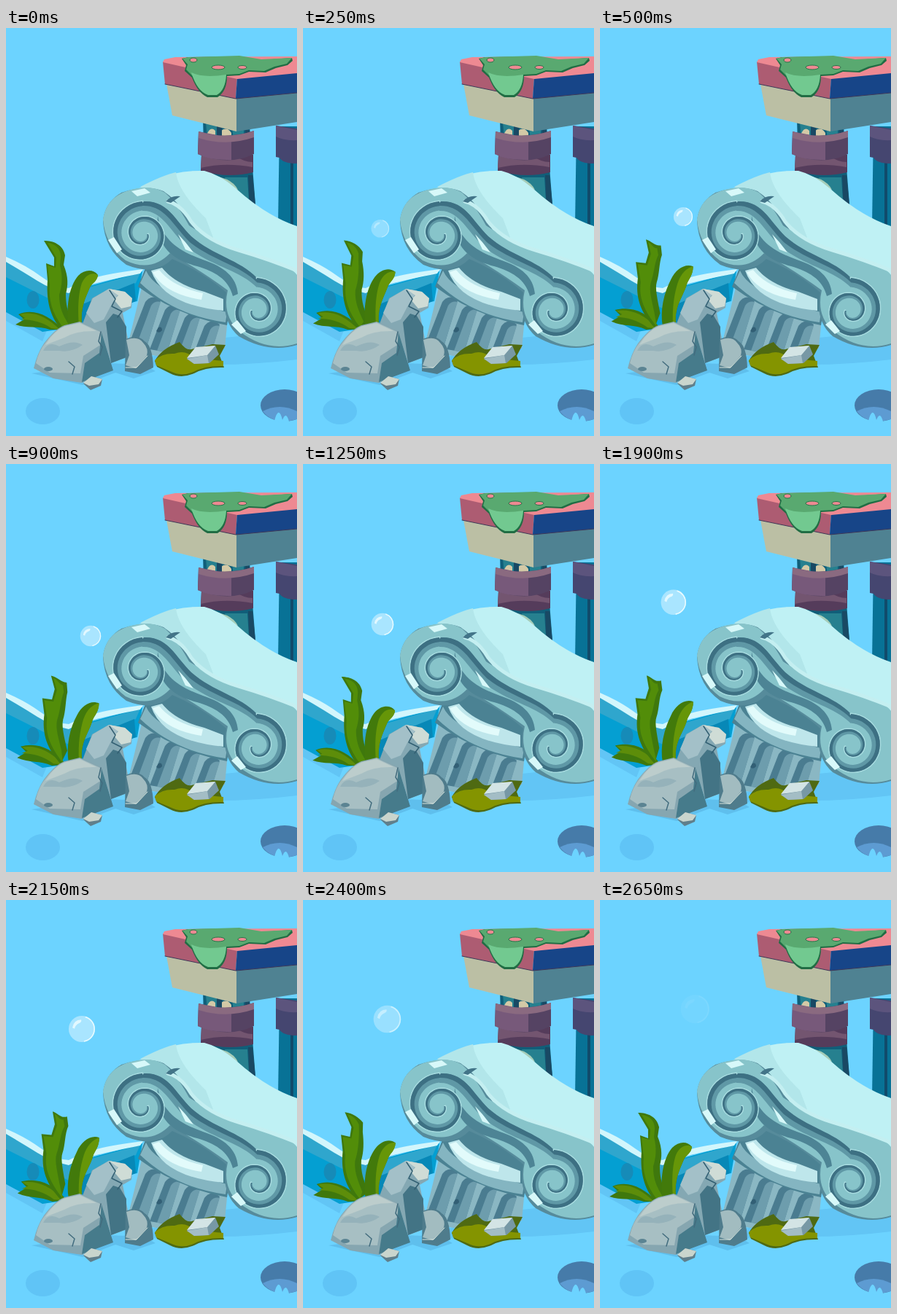
Write an HTML page that moves like this. It is 399 px wide and 560 px high and loops after 2.7 s.

```html
<!DOCTYPE html>
<html lang="en">
<head>
<meta charset="utf-8">
<title>Sunken ruins</title>
<style>
html, body { margin: 0; width: 100%; height: 100%; overflow: hidden; background: #6cd3ff; }
svg { display: block; width: 100vw; height: 100vh; }
.line { fill: none; stroke-linecap: round; stroke-linejoin: round; }
</style>
</head>
<body>
<svg viewBox="0 0 399 560">
  <!-- sea wall and floor -->
  <path fill="#62c5f5" d="M0 382L60 405 50 430 0 402ZM145 465L300 425 399 415V455Q310 466 230 460L145 474Z"/>
  <path fill="#049fd2" d="M0 318L86 362 187 334 180 375 120 385 100 410 50 417 0 390Z"/>
  <path fill="#2fa6cd" d="M0 319L86 364 184 336 178 350 115 376 88 386 0 342Z"/>
  <path fill="#0788b7" d="M88 386L176 350 178 375 105 405Z"/>
  <path fill="#d2f6fc" d="M0 314Q28 326 48 341T86 357Q108 346 128 341T188 331L184 337Q145 345 124 350T86 364Q62 359 43 347T0 321Z"/>
  <ellipse cx="37" cy="373" rx="8.500" ry="12" fill="#168bb8"/>
  <ellipse cx="50.500" cy="526" rx="23.500" ry="18" fill="#60c4f6"/>
  <ellipse cx="382" cy="518" rx="33" ry="22" fill="#467ba9"/>
  <path fill="#5d9bd2" d="M352 526Q375 514 399 526V537Q367 546 352 526Z"/>
  <path fill="#6cd3ff" d="M368 539Q374 517 379 538 384 525 388 540Q378 544 368 539Z"/>

  <!-- distant columns -->
  <path fill="#105e79" d="M270 124H334L335 160H271ZM270 191H338L343 255H268Z"/>
  <path fill="#26808f" d="M274 130L290 134V152H276ZM310 136L326 139V153H312ZM300 205H331L334 253H310Z"/>
  <path fill="#d3c9a6" d="M275 147Q280 134 287 141V152H276ZM295 151V141Q303 135 309 144V153Z"/>
  <path fill="#194964" d="M289 132L296 134V153H289ZM328 140H334V153H328ZM332 202H338L343 253H334Z"/>
  <path fill="#553c5b" d="M268 174H339V198Q305 207 267 196Z"/>
  <path fill="#735570" d="M268 174H310Q327 184 338 184V191Q300 184 267 192Z"/>
  <path fill="#554363" d="M264 142Q300 154 340 141V173Q305 190 263 173Z"/>
  <path fill="#77597a" d="M264 142L309 151V181Q280 182 263 173Z"/>
  <path fill="#8a6a80" d="M264 142Q302 154 340 141V150Q302 163 264 151Z"/>
  <path fill="#a6cdb8" d="M272 203Q308 202 318 222L300 215Q285 208 271 208Z"/>
  <path fill="#087296" d="M375 135H399V273H373Z"/>
  <path fill="#104b6b" d="M390 185H394V272H390Z"/>
  <path fill="#454670" d="M370 134L399 138V186Q380 186 375 178L370 177Z"/>
  <path fill="#5c547d" d="M370 134L399 140V154Q381 155 370 149Z"/>

  <!-- broken entablature -->
  <path fill="#bbbfa4" d="M220 77L316 96V142L228 120Z"/>
  <path fill="#4f8292" d="M316 96L399 89V129L316 142Z"/>
  <path fill="#ad5c72" d="M215 46L317 69 315 97 218 77Z"/>
  <path fill="#174588" d="M317 69L399 61V89L315 97Z"/>
  <path fill="#ee8992" d="M217 43L232 40 399 39V62L317 70 215 47Z"/>
  <path class="line" stroke="#3e3757" stroke-width="1" d="M218 77L315 97 399 89"/>
  <path fill="#216d44" d="M241 42L250 40 320 39 350 44 392 41 393 45 386 51 370 55 356 61 333 60 320 65 303 66Q303 87 290 95H276Q263 89 255 68L245 59 247 51Z"/>
  <path fill="#59a970" d="M242 42L250 40 320 38 350 43 392 41 385 49 368 53 354 59 333 58 320 63 302 64 298 72 262 74 256 66 247 57 249 50Z"/>
  <path fill="#72c990" d="M254 61Q270 69 302 64 301 85 289 92H277Q262 87 254 61Z"/>
  <g fill="#ee8992" stroke="#287449">
    <ellipse cx="291" cy="54" rx="9" ry="3"/><ellipse cx="324" cy="54" rx="6" ry="2.500"/>
    <ellipse cx="257" cy="44" rx="5" ry="3"/>
  </g>

  <!-- seaweed -->
  <g id="weed"></g>

  <!-- column shaft and neck -->
  <path fill="#8ab7c3" d="M165 443L190 340 304 398 300 440 230 454Z"/>
  <g id="flutes"></g>
  <path fill="#325f75" d="M209 411q5-2 5 4q-4 5-8 1Z"/>
  <path fill="#4b8293" d="M194 322L240 310 312 350 303 408Q235 395 181 355Z"/>
  <path fill="#84b5c1" d="M192 333Q206 366 303 390L301 404Q230 394 184 350Z"/>
  <path fill="#bee6eb" d="M199 333L214 329Q232 352 272 362L298 372V388Q215 380 199 333Z"/>
  <path fill="#e2fbfb" d="M201 335L210 332Q228 355 270 364L268 373Q217 365 201 335Z"/>

  <!-- capital -->
  <path fill="#bff1f4" d="M155 227Q193 219 213 207T272 196Q293 201 315 220 357 258 399 272V355L330 330 250 290 225 242Z"/>
  <path fill="#b2e6ea" d="M184 218Q215 202 233 198 236 225 274 261L285 290 250 287 226 239Z"/>
  <path fill="#568b9b" d="M133 265Q135 240 158 226 192 214 216 224 239 239 260 277 300 304 356 319 389 328 399 341V435Q360 447 319 423 294 401 302 363 270 335 228 317 204 341 165 325 135 304 133 265Z"/>
  <path fill="#87c4ca" d="M133 263Q137 234 165 224 197 213 218 226 234 240 251 271 293 299 349 314 389 325 399 339V433Q358 446 320 416 296 395 304 360 269 334 225 309 199 336 164 319 136 298 133 263Z"/>
  <path class="line" stroke="#c4eff1" stroke-width="5" d="M222 238Q240 242 254 266 275 292 319 305T399 333"/>
  <path fill="#5f98a6" d="M187 238C222 236 230 262 254 286 285 313 320 318 344 343V356C320 332 285 328 250 302 225 280 215 250 187 251Z"/>
  <path fill="#3d7083" d="M187 238C222 236 230 262 254 286 285 313 320 318 344 343V349C320 325 285 320 252 294 228 270 218 243 187 244Z"/>
  <path fill="#4d8495" d="M208 258C214 290 236 306 270 318 300 328 316 342 318 365L311 368C305 344 285 334 262 327 228 318 205 300 208 258Z"/>
  <g id="volutes"></g>
  <path fill="#d7f8f9" d="M172 224L190 220 198 226 180 231ZM140 291L148 287 159 304 152 309ZM309 407L317 401 329 416 322 420ZM236 283L246 294 257 308 246 304Z"/>
  <path fill="#427488" d="M219 238Q227 229 239 231L226 240Z"/>

  <!-- rocks -->
  <path fill="#5fbfed" d="M35 474L105 490 150 473 175 481 205 471 190 462 140 460Z"/>
  <path fill="#84a8b3" d="M105 406L118 371 141 358 163 362 173 371 172 384 160 391 167 426 163 453 144 460 133 425Z"/>
  <path fill="#a3c0c8" d="M110 391L119 371 141 358 157 361 146 377 134 400 121 405Z"/>
  <path fill="#437485" d="M137 404L147 392 156 395 165 410V452L144 460Z"/>
  <path fill="#cfdcd6" d="M141 358L163 362 173 371 171 382 158 385 148 373 154 367Z"/>
  <path class="line" stroke="#325f72" stroke-width="1.500" d="M142 360L150 372 145 382 159 389 153 397"/>
  <path fill="#86a6b0" d="M38 467Q43 446 52 433 67 413 80 408L101 403 131 416 146 469 104 487 65 481Z"/>
  <path fill="#a7bfc3" d="M41 460Q45 443 54 432 67 414 80 409L101 404 129 417 131 434 106 450 102 474 60 473Z"/>
  <path fill="#bccdcc" d="M54 435Q67 414 82 409L101 405 124 416Q96 415 80 425Z"/>
  <path fill="#467b8b" d="M131 418L147 470 104 486 108 460 128 446Z"/>
  <path fill="#95b2ba" d="M51 443Q58 429 73 437 93 427 105 435 90 446 73 443Z"/>
  <path class="line" stroke="#426c7e" stroke-width="1.500" d="M130 417L127 430 132 438 129 449M86 458L94 465 91 475"/>
  <ellipse cx="58" cy="468" rx="6" ry="3" fill="#5b8493"/>
  <path fill="#4f7c8c" d="M164 427Q181 420 190 430 201 436 202 466L184 475 163 471Z"/>
  <path fill="#a2bcc0" d="M165 428Q181 422 188 432 196 440 193 450L178 467 164 463 169 449Z"/>
  <path class="line" stroke="#dbe7df" d="M164 466L179 466 194 450"/>
  <path fill="#607f8b" d="M106 488L117 478 132 482 130 491 116 497Z"/>
  <path fill="#c9d5cd" d="M106 487L117 478 132 482 127 489 114 491Z"/>

  <!-- moss and pale stone -->
  <path fill="#4f6a12" d="M204 457Q213 440 238 431 247 443 254 441L283 434 301 435 293 450 299 466Q274 465 258 474 240 482 225 474L207 465Z"/>
  <path fill="#849400" d="M204 456Q214 446 231 447 247 441 257 453L298 457V464Q273 463 257 472 240 479 225 471L206 463Z"/>
  <path fill="#7798a5" d="M248 454L260 439 287 436 292 448 279 460 258 461Z"/>
  <path fill="#d3e4e5" d="M248 453L260 438 287 436 276 449Z"/>
  <path fill="#a3bdc5" d="M248 454L276 449 278 460 258 461Z"/>

  <!-- bubble, unit radius -->
  <g id="bubble">
    <circle r="1" fill="#a9e5ff"/>
    <path class="line" stroke="#e9fbff" stroke-width=".09" d="M.3 -.9A.95 .95 0 0 1 .2 .93"/>
    <path fill="#e2f8ff" d="M-.72 -.1Q-.62 -.68 -.05 -.7Q.02 -.5 -.25 -.42Q-.5 -.3 -.55 -.02Z"/>
  </g>
</svg>
<script>
const LOOP = 2700, STEP = 50, SVG = 'http://www.w3.org/2000/svg';
const $ = id => document.getElementById(id);
const lerp = (a, b, k) => a + (b - a) * k;

function addPath(parent, attrs) {
  const path = document.createElementNS(SVG, 'path');
  for (const name in attrs) path.setAttribute(name, attrs[name]);
  return parent.appendChild(path);
}

// Points from the outer radius to the eye; angles are in turns
function spiral(cx, cy, from, to, size) {
  return Array.from({ length: 81 }, (_, i) => {
    const angle = lerp(from, to, i / 80) * Math.PI * 2, r = lerp(45, 8, i / 80) * size;
    return (cx + r * Math.cos(angle)).toFixed(1) + ' ' + (cy + r * Math.sin(angle)).toFixed(1);
  });
}

for (const turn of [[187, 283, -.25, -2], [344, 388, -.25, 1.5]]) {
  const outer = spiral(...turn, 1);
  const groove = size => 'M' + outer.concat(spiral(...turn, size).reverse()).join('L') + 'Z';
  addPath($('volutes'), { d: 'M' + outer.join('L'), class: 'line', stroke: '#a9dde1', 'stroke-width': 3 });
  addPath($('volutes'), { d: groove(.72), fill: '#5f98a6' });
  addPath($('volutes'), { d: groove(.86), fill: '#3d7083' });
}

for (let i = 0; i < 4; i++) {
  const transform = `translate(${192 + i * 27} ${368 + i * 11})`;
  addPath($('flutes'), { d: 'M-22 62L-1 8Q8 -4 20 6L2 66Z', fill: '#4a7c90', transform });
  addPath($('flutes'), { d: 'M-12 64L7 13Q12 6 20 8L2 66Z', fill: '#6d9dad', transform });
}

// Each blade: colour, left pose, right pose
const blades = [
  ['#3f780d',
   'M78 414C60 395 38 384 17 393L25 400 13 407C28 413 45 408 60 414Z',
   'M84 412C64 387 42 381 21 386L29 394 16 402C34 410 47 406 64 414Z'],
  ['#5d8d0a',
   'M74 414C56 397 39 388 19 393L26 398 20 400C36 400 51 404 62 412Z',
   'M80 412C60 391 43 385 23 387L31 392 22 396C38 396 53 401 66 411Z'],
  ['#3f780d',
   'M75 413C60 395 55 373 57 346L55 323 66 327 66 315 52 292C65 292 78 297 81 312L79 325C86 342 85 354 82 365C82 387 88 398 96 410Z',
   'M75 411C55 390 47 369 51 343L48 321 62 322 67 307 65 290 73 293 74 300 84 296C86 309 80 319 81 335C77 346 74 352 77 367C80 388 88 396 96 410Z'],
  ['#528d09',
   'M78 411C63 391 58 373 60 352L57 326 68 329 69 315 57 295C67 296 75 302 75 314L74 326C78 341 77 353 73 366C73 387 80 397 88 410Z',
   'M78 410C60 387 52 370 55 348L51 324 64 325 70 309 68 294 72 296 73 303 79 300C81 309 74 318 74 333C69 347 66 355 69 368C72 387 80 397 88 410Z'],
  ['#427a0b',
   'M86 412C82 384 86 355 99 340C108 331 120 331 126 339C125 348 118 350 115 356C108 372 102 385 104 407Z',
   'M86 410C82 388 88 365 97 346C103 331 116 321 128 325C128 338 122 344 120 350C115 369 102 380 104 405Z'],
  ['#669608',
   'M100 408C98 379 100 362 104 350C110 337 119 335 126 339C125 348 118 350 115 356C108 372 102 385 104 407Z',
   'M100 407C99 385 102 366 107 350C111 337 119 328 128 325C128 338 122 344 120 350C115 369 102 380 104 405Z']
].map(([fill, left, right]) => ({
  path: addPath($('weed'), { fill }),
  left,
  right: right.match(/\d+/g)
}));

// Bubble way points: time, x, y
const route = [[0, 96, 292], [500, 114, 259], [900, 116, 236], [1250, 109, 220],
               [1650, 102, 202], [2150, 104, 177], [2700, 133, 147]];

function slope(i, axis) {
  const a = route[Math.max(i - 1, 0)], b = route[Math.min(i + 1, route.length - 1)];
  return (b[axis] - a[axis]) / (b[0] - a[0]);
}

function along(t, axis) {
  const i = Math.max(0, route.findIndex(p => p[0] > t) - 1);
  const a = route[i], b = route[i + 1], span = b[0] - a[0], k = (t - a[0]) / span;
  return lerp(a[axis], b[axis], k * k * (3 - 2 * k)) +
    span * k * (1 - k) * ((1 - k) * slope(i, axis) - k * slope(i + 1, axis));
}

function draw(now) {
  const t = Math.floor(now % LOOP / STEP) * STEP;
  const sway = (1 - Math.cos(t / LOOP * 4 * Math.PI)) / 2;
  for (const { path, left, right } of blades) {
    let i = 0;
    path.setAttribute('d', left.replace(/\d+/g, n => lerp(+n, +right[i++], sway).toFixed(2)));
  }
  const radius = 11.6 + t * .003;
  $('bubble').setAttribute('transform', `translate(${along(t, 1)} ${along(t, 2)}) scale(${radius})`);
  $('bubble').setAttribute('opacity', Math.min(1, t / 400, (LOOP - t) / 400));
  requestAnimationFrame(() => draw(performance.now()));
}
draw(performance.now());
</script>
</body>
</html>
```
